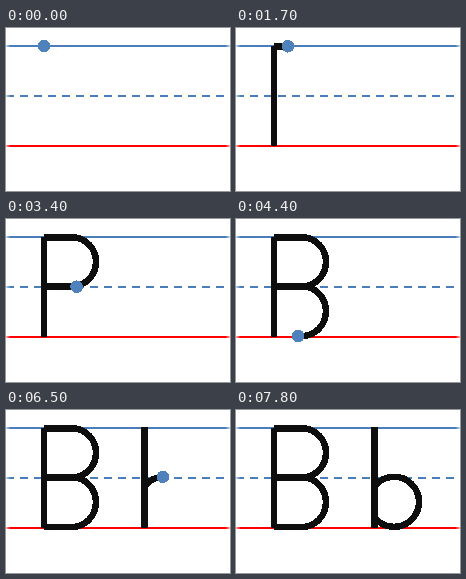
Animation of 224x163 px, one loop 7.9 s. Source, as an HTML page:

```html
<!DOCTYPE html>
<html lang="en">
<head>
<meta charset="utf-8">
<title>Writing the letter B</title>
<style>
  html, body { margin: 0; width: 100%; height: 100%; overflow: hidden; background: #fff; }
  svg { display: block; width: 224px; height: 163px; }
  path { fill: none; }
  .rule { stroke: #4a7ebb; stroke-width: 2; }
  .base { stroke: #f00; }
  #ink { stroke: #0e0e0e; stroke-width: 6.5; shape-rendering: crispEdges; }
</style>
</head>
<body>
<svg viewBox="0 0 224 163">
  <linearGradient id="fade">
    <stop offset="0" stop-color="#fff" stop-opacity=".7"/>
    <stop offset=".02" stop-color="#fff" stop-opacity="0"/>
    <stop offset=".98" stop-color="#fff" stop-opacity="0"/>
    <stop offset="1" stop-color="#fff" stop-opacity=".7"/>
  </linearGradient>
  <path class="rule" d="M0 18H224"/>
  <path class="rule" d="M0 68H219" stroke-dasharray="8 6"/>
  <path class="rule base" d="M0 118H224"/>
  <rect width="224" height="163" fill="url(#fade)"/>
  <g id="ink"></g>
  <circle id="dot" r="6.3" fill="#4f81bd" shape-rendering="crispEdges"/>
</svg>
<script>
const LOOP = 7900, STEP = 100;
const ink = document.getElementById('ink');
const dot = document.getElementById('dot');

// Each leg is travelled at a steady speed; legs follow one another.
let end = 0;
function leg(d, duration) {
  const path = document.createElementNS('http://www.w3.org/2000/svg', 'path');
  path.setAttribute('d', d);
  path.setAttribute('pathLength', 1);
  ink.append(path);
  const start = end;
  end += duration;
  return { path, start, duration, length: path.getTotalLength() };
}

const legs = [
  leg('M38 18V118', 850),
  leg('M38 118V18', 700),
  leg('M38 18.3H66A24 24.5 0 0 1 66 67.3H38', 1420),
  leg('M38 67.3H66A24 24.85 0 0 1 66 117H38', 1750),
  leg('M138.5 17h0', 280), // rest above the next letter
  leg('M138.5 17V118', 1000),
  leg('M138.5 118V76.2', 250),
  leg('M138.5 76.2A25 25 0 1 1 138.5 107.4', 1450)
];

function draw(now) {
  const t = Math.floor(now % LOOP / STEP) * STEP;
  for (const { path, start, duration, length } of legs) {
    const done = Math.min(1, Math.max(0, (t - start) / duration));
    path.style.visibility = done > 0 ? 'visible' : 'hidden';
    path.setAttribute('stroke-dasharray', done < 1 ? `${done} 2` : 'none');
    if (t >= start) {
      const { x, y } = path.getPointAtLength(done * length);
      dot.setAttribute('cx', x);
      dot.setAttribute('cy', y);
    }
  }
  dot.style.visibility = t <= end ? 'visible' : 'hidden';
}

const begin = performance.now();
function tick() {
  draw(performance.now() - begin);
  requestAnimationFrame(tick);
}
tick();
</script>
</body>
</html>
```
